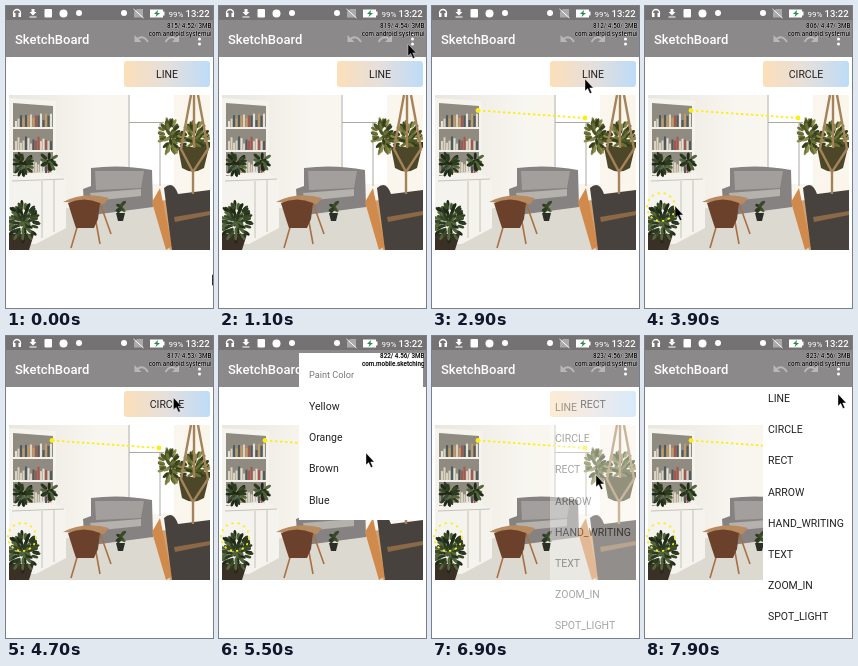
An HTML page that plays this animation: 207x302 px, repeating every 8000 ms.

```html
<!DOCTYPE html>
<html lang="en">
<head>
<meta charset="utf-8">
<title>SketchBoard</title>
<style>
  html, body { margin: 0; width: 100%; height: 100%; overflow: hidden; background: #fff; }
  svg { display: block; width: 100vw; height: 100vh; font: 10.5px Roboto, sans-serif; fill: #222; }
  .mark { fill: none; stroke: #fdee12; stroke-width: 1.8; }
  .dot { fill: #fdee12; stroke: none; }
  .line { fill: none; }
  .stat { font-size: 6.3px; font-weight: 500; text-anchor: end; paint-order: stroke; stroke: #ddd; stroke-width: .6px; fill: #000; }
</style>
</head>
<body>
<svg viewBox="0 0 207 302" preserveAspectRatio="none">
  <defs>
    <linearGradient id="tint">
      <stop offset="0" stop-color="#fcdfb9"/>
      <stop offset=".5" stop-color="#e5dfdc"/>
      <stop offset="1" stop-color="#bddcf8"/>
    </linearGradient>
    <linearGradient id="wall">
      <stop offset="0" stop-color="#e9e6de"/>
      <stop offset=".45" stop-color="#f8f6f0"/>
      <stop offset="1" stop-color="#fbf6ec"/>
    </linearGradient>
    <clipPath id="frame"><path d="M3 89H204V244H3Z"/></clipPath>
    <clipPath id="belowBar"><path d="M0 51H207V302H0Z"/></clipPath>
  </defs>

  <path fill="#fff" d="M0 0H207V302H0Z"/>

  <g clip-path="url(#frame)">
    <path fill="url(#wall)" d="M3 89H204V244H3Z"/>
    <path fill="#d3a070" d="M120 198L204 190V244H120Z"/>
    <path fill="#dcd9d0" d="M50 203L150 196L164 244H20Z"/>
    <!-- window -->
    <path fill="#fff" d="M122 89H168V178H122Z"/>
    <path class="line" stroke="#aaa9a4" d="M123 89V165M123 116.500H158M154 117V180"/>
    <!-- bookcase and cabinet -->
    <path fill="#f5f3ee" d="M3 92L50 95V168L60 173V222L30 238H3Z"/>
    <path fill="#8f8b80" d="M7 97L47 100V164L7 170Z"/>
    <g id="books"></g>
    <path class="line" stroke="#c6c2b8" d="M6 175L58 173M36 175V232M48 174V226"/>
    <!-- sofa -->
    <path fill="#858281" d="M85 162Q115 158 146 164L147 201L79 210L77 183L85 180Z"/>
    <path fill="#a29f9c" d="M89 165H138L135 182L90 184Z"/>
    <path fill="#b5b2ae" d="M84 187L135 183V190L86 195Z"/>
    <!-- wooden table and chair -->
    <path fill="#b88a60" d="M57 196Q78 185 103 192L98 198Z"/>
    <path class="line" stroke="#a87145" stroke-width="1.600" d="M72 218L65 242M90 216L94 238M94 197L105 228"/>
    <path fill="#6c412b" d="M62 197Q78 190 94 197L92 213L88 222H70L67 213Z"/>
    <!-- floor pot -->
    <path fill="#2b2f28" d="M110 207H119L117 215H112Z"/>
    <!-- desk corner -->
    <path fill="#d08a4c" d="M146 196L154 182L166 240L160 244Z"/>
    <path fill="#47423e" d="M158 182Q167 174 172 188L204 184V244H166Z"/>
    <path fill="#8b6846" d="M168 211L204 205V209L169 216Z"/>
    <path fill="#3a3026" d="M3 228H28L23 244H3Z"/>
    <g id="leaves"></g>
    <!-- hanging basket -->
    <path fill="#4b4728" d="M172 141H203L198 162Q187 169 176 162Z"/>
    <path class="line" stroke="#a5835a" stroke-width="2.400" d="M185 89L175 143L187 166L202 143L192 89M188 89V142M187 166V188"/>
  </g>

  <g id="lineMark" class="mark">
    <path id="stroke" stroke-dasharray="2.500 2.500"/>
    <circle class="dot" cx="46" cy="104.500" r="2.400"/>
    <circle id="lineEnd" class="dot" r="2.400"/>
  </g>
  <circle id="ring" class="mark" cx="16" cy="201" stroke-dasharray="2.200 4"/>

  <path fill="#8b8989" d="M0 0H207V51H0Z"/>
  <path fill="#747272" d="M0 0H207V14H0Z"/>
  <g fill="#fff">
    <path class="line" stroke="#fff" stroke-width="1.300" d="M7.500 8V7A3.500 3.500 0 0 1 14.500 7V8"/>
    <path d="M7 7H9.500V11H7ZM12.500 7H15V11H12.500ZM25.500 3H28.500V6H30.500L27 9.500L23.500 6H25.500ZM23.500 10.500H30.500V11.500H23.500Z"/>
    <rect x="38.500" y="3" width="7.500" height="8.500" rx="1"/>
    <circle cx="57.500" cy="7.500" r="4"/>
    <circle cx="73" cy="7" r="3"/>
    <circle cx="118" cy="7" r="3"/>
    <path fill="#aaa" d="M128 11.500V6L131 3H137V11.500Z"/>
    <path class="line" stroke="#fff" d="M127.500 3L137.500 12"/>
    <path d="M144 3.500H157V5.500H158.500V9.500H157V11.500H144Z"/>
    <path fill="#278c52" d="M152 4L148 8H150.500L149.500 11L154 7H151.500Z"/>
    <text x="162.500" y="10.500" font-size="8">99%</text>
    <text x="179.500" y="11" font-size="9.500" font-weight="500">13:22</text>
    <text x="9" y="37.500" font-size="13" font-weight="500">SketchBoard</text>
    <g id="undo" fill="#b9b7b7">
      <path d="M128.500 29V36H135.500Z"/>
      <path class="line" stroke="#b9b7b7" stroke-width="1.800" d="M131 33.500Q137 28 142 36"/>
    </g>
    <use href="#undo" transform="matrix(-1 0 0 1 301.500 0)"/>
    <path class="line" stroke="#fff" stroke-width="3" stroke-linecap="round" stroke-dasharray="0 5" d="M193.500 28V38.500"/>
  </g>

  <rect x="118" y="55" width="86" height="26" rx="3" fill="url(#tint)"/>
  <text id="mode" x="161" y="72" text-anchor="middle"></text>

  <g clip-path="url(#belowBar)">
    <g id="shapes"><path fill="#fff" d="M118 51H204V320H118Z"/></g>
  </g>
  <g id="colors">
    <path fill="#fff" d="M80 17H204V184H80Z"/>
    <text x="90" y="42" font-size="9.200" fill="#777">Paint Color</text>
  </g>

  <text id="memory" class="stat" x="205.500" y="22"></text>
  <text id="process" class="stat" x="205.500" y="30"></text>
  <path id="cursor" stroke="#fff" stroke-width=".4" fill="#000" d="M0 0V12L2.700 9.500L5 14.500L6.800 13.700L4.700 8.900H8.300Z"/>
</svg>

<script>
const LOOP = 8000, PAUSE = 500, REFRESH = 200, TRAVEL = 800;
const $ = id => document.getElementById(id);
const clamp = value => Math.min(1, Math.max(0, value));
const ease = k => k * k * (3 - 2 * k);

function add(parent, tag, attrs, text = '') {
  const node = document.createElementNS('http://www.w3.org/2000/svg', tag);
  for (const key in attrs) node.setAttribute(key, attrs[key]);
  node.textContent = text;
  parent.append(node);
}

function addItems(parent, x, y, names) {
  names.forEach((name, i) => add(parent, 'text', { x, y: y + i * 31.2 }, name));
}
addItems($('shapes'), 123, 75, ['LINE', 'CIRCLE', 'RECT', 'ARROW', 'HAND_WRITING', 'TEXT', 'ZOOM_IN', 'SPOT_LIGHT']);
addItems($('colors'), 90, 74, ['Yellow', 'Orange', 'Brown', 'Blue']);

let seed = 7;
const random = () => (seed = seed * 16807 % 2147483647) / 2147483647;
const pick = list => list[Math.floor(random() * list.length)];

for (let shelf = 121; shelf < 170; shelf += 23) {
  for (let x = 9; x < 45; x += 2.5) {
    const height = 6 + random() * 8;
    add($('books'), 'rect', { x, y: shelf - height, width: 2, height,
      fill: pick(['#a8564c', '#d9d2c0', '#4f5a5c', '#c29a62', '#e6e1d6']) });
  }
  add($('books'), 'rect', { x: 5, y: shelf, width: 44, height: 2, fill: '#f4f1ea' });
}

function plant(cx, cy, rx, ry, tones) {
  for (let i = 0; i < rx * ry / 3; i++) {
    const angle = random() * 2 * Math.PI, reach = Math.sqrt(random());
    const x = cx + rx * reach * Math.cos(angle), y = cy + ry * reach * Math.sin(angle);
    add($('leaves'), 'ellipse', { cx: x, cy: y, rx: 3.6, ry: 1.5,
      transform: `rotate(${angle * 180 / Math.PI} ${x} ${y})`, fill: pick(tones) });
  }
}
const dark = ['#2b3a20', '#3a4a27', '#53653a', '#1f2a18'];
const olive = ['#4d5726', '#6c7033', '#353f1c', '#8b8b4b'];
plant(17, 158, 9, 10, dark);
plant(43, 155, 7, 8, dark);
plant(17, 216, 14, 19, dark);
plant(115, 201, 4, 6, dark);
plant(164, 131, 10, 17, olive);
plant(188, 136, 15, 20, olive);

// Pointer stops: arrival time, x, y
const stops = [[0, 206, 268], [1100, 189, 38], [1500, 46, 104], [2100, 153, 112], [2900, 153, 73], [3500, 146, 102],
  [3900, 30, 200], [4900, 193, 36], [5500, 147, 117], [6700, 164, 139], [7700, 193, 58]];

function pointerAt(t) {
  const next = stops.findIndex(([arrival]) => arrival >= t);
  if (next < 1) return stops.at(next).slice(1);
  const [left, x0, y0] = stops[next - 1], [arrival, x1, y1] = stops[next];
  const k = ease(clamp(1 - (arrival - t) / Math.min(TRAVEL, arrival - left)));
  return [x0 + (x1 - x0) * k, y0 + (y1 - y0) * k];
}

const menus = [
  { open: 3100, picked: 3500, mode: 'CIRCLE' },
  { open: 5900, picked: 6900, mode: 'RECT' },
  { open: 7900, picked: LOOP, slide: -9 },
];

function menuAlpha(t) {
  const menu = menus.find(({ open, picked }) => t >= open && t < picked + REFRESH);
  return !menu ? 0 : t < menu.picked ? 1 : .4;
}

function draw(t) {
  const [x, y] = pointerAt(t);
  $('cursor').setAttribute('transform', `translate(${x} ${y})`);

  const [endX, endY] = pointerAt(1500 + 600 * clamp((t - 1500) / 600));
  $('lineMark').style.display = t > 1500 ? '' : 'none';
  $('stroke').setAttribute('d', `M46 104.5L${endX} ${endY}`);
  $('lineEnd').setAttribute('cx', endX);
  $('lineEnd').setAttribute('cy', endY);
  $('ring').setAttribute('r', 14 * clamp((t - 3500) / 400));

  const last = menus.findLast(({ picked }) => picked <= t);
  const slide = menus.find(({ open, slide }) => slide && t >= open)?.slide ?? 0;
  $('mode').textContent = last ? last.mode : 'LINE';
  $('shapes').style.opacity = menuAlpha(t);
  $('shapes').setAttribute('transform', `translate(0 ${slide})`);

  const coloring = t >= 5100 && t < 5900;
  $('colors').style.opacity = coloring ? 1 : 0;
  $('process').textContent = coloring ? 'com.mobile.sketching' : 'com.android.systemui';
  const wave = Math.sin(t);
  $('memory').textContent = `${Math.round(815 + 9 * wave)}/ ${(4.52 + .05 * wave).toFixed(2)}/ 3MB`;
}

const start = performance.now();
function tick() {
  const t = Math.max(0, performance.now() - start) % LOOP;
  draw(t < PAUSE ? 0 : PAUSE + Math.floor((t - PAUSE) / REFRESH) * REFRESH);
  requestAnimationFrame(tick);
}
tick();
</script>
</body>
</html>
```
